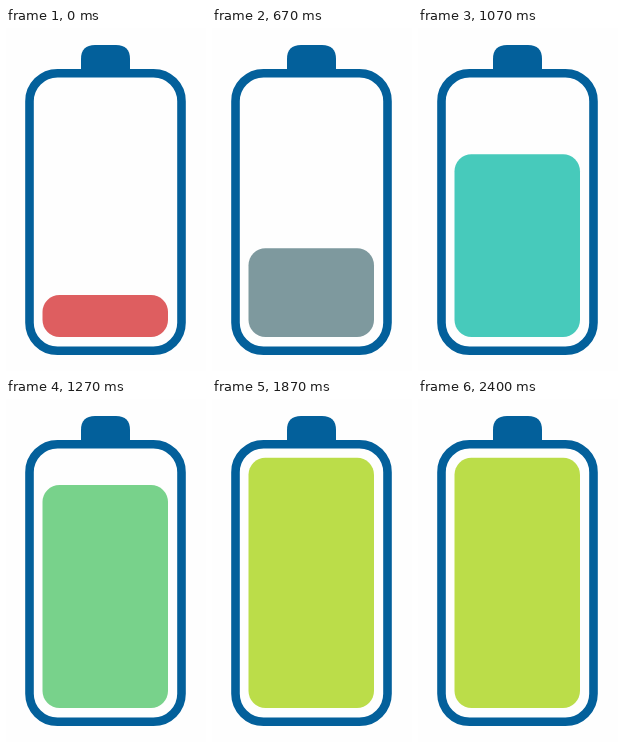
Write an HTML page that moves like this. It is 200 px wide and 343 px high and loops after 2.87 s.

```html
<!DOCTYPE html>
<html lang="en">
<head>
<meta charset="utf-8">
<title>Charging battery</title>
<style>
  html, body { margin: 0; width: 100%; height: 100%; overflow: hidden; background: #fefefe; }
  svg { display: block; width: 100%; height: 100%; }
</style>
</head>
<body>
<svg viewBox="0 0 200 343">
  <path d="M75 46V31Q75 17 89 17H110Q124 17 124 31V46Z" fill="#03609b"/>
  <rect x="23.5" y="45.2" width="152" height="277.6" rx="28" fill="#fefefe" stroke="#03609b" stroke-width="8.6"/>
  <rect id="charge" x="36.5" width="125.5" rx="17"/>
</svg>
<script>
const LOOP = 2870, STEP = 1000 / 15;
const START = 248, DURATION = 1333;
const EMPTY = 267, FULL = 58.7, BOTTOM = 309;
const RED = [222, 94, 96], TEAL = [52, 199, 206], LIME = [187, 221, 73];
const TEAL_AT = 0.555, LIME_AT = 0.97;

const charge = document.getElementById('charge');
const clamp = x => Math.min(1, Math.max(0, x));
const mix = (a, b, k) => a + (b - a) * k;
const blend = (from, to, k) => `rgb(${from.map((c, i) => Math.round(mix(c, to[i], k)))})`;

function draw(now) {
  // Advance at 15 steps per second, with switches rounded to 10 ms
  const time = Math.floor((now % LOOP + 4) / STEP) * STEP;
  const u = clamp((time - START) / DURATION);
  const top = mix(EMPTY, FULL, (1 - Math.cos(Math.PI * u)) / 2);
  charge.setAttribute('y', top);
  charge.setAttribute('height', BOTTOM - top);
  charge.setAttribute('fill', u < TEAL_AT
    ? blend(RED, TEAL, u / TEAL_AT)
    : blend(TEAL, LIME, clamp((u - TEAL_AT) / (LIME_AT - TEAL_AT))));
}

const began = performance.now();
function tick() {
  draw(performance.now() - began);
  requestAnimationFrame(tick);
}
tick();
</script>
</body>
</html>
```
